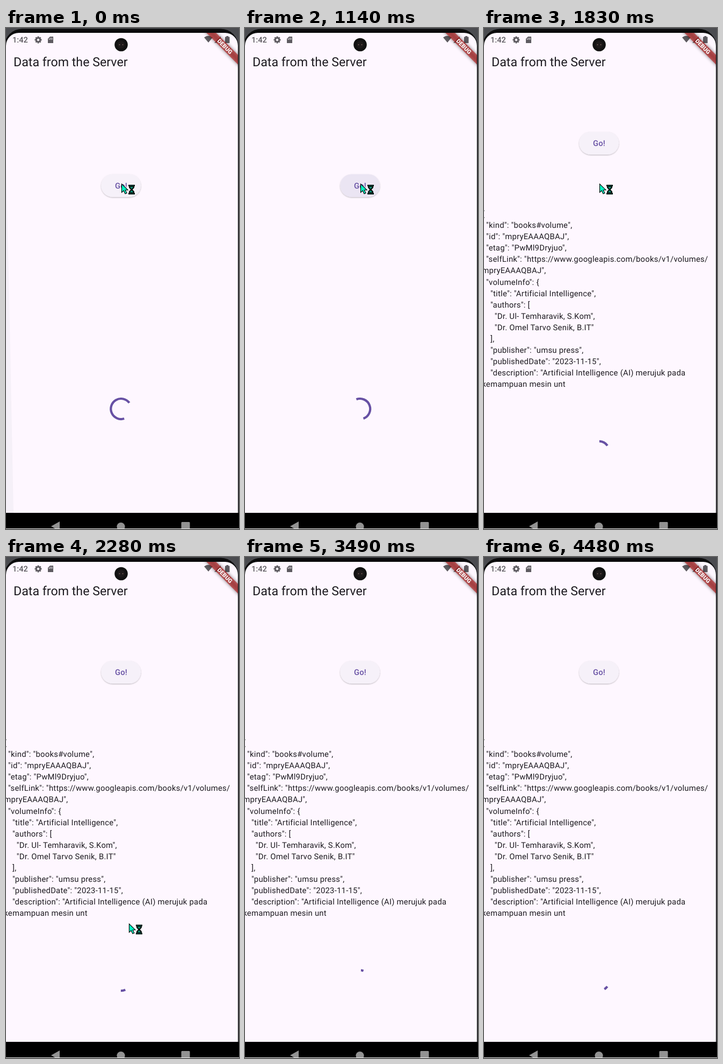
An HTML page for the animation above (4.5 s loop, 434 by 930 pixels).

```html
<!DOCTYPE html>
<html lang="en">
<head>
<meta charset="utf-8">
<title>Future demo</title>
<style>
  html, body { margin: 0; width: 100%; height: 100%; overflow: hidden; background: #000; }
  svg { display: block; width: 434px; height: 930px; }
  text { font-family: Roboto, sans-serif; white-space: pre; text-rendering: geometricPrecision; }
</style>
</head>
<body>
<svg viewBox="0 0 434 930" xmlns="http://www.w3.org/2000/svg">
  <defs>
    <path id="screenShape" d="M0 900V33A24 24 0 0 1 24 9H408A24 24 0 0 1 432 33V900Z"/>
    <clipPath id="screenClip"><use href="#screenShape"/></clipPath>
    <filter id="buttonShadow" x="-20%" y="-20%" width="140%" height="150%">
      <feDropShadow dx="0" dy="1" stdDeviation="0.8" flood-color="#000" flood-opacity="0.28"/>
    </filter>
    <filter id="blur" x="-20%" y="-100%" width="140%" height="300%"><feGaussianBlur stdDeviation="3"/></filter>
  </defs>

  <rect width="434" height="930" fill="#4b4c50"/>
  <rect x="-3" y="1.5" width="436" height="960" rx="33" fill="#0b0b0c"/>
  <use href="#screenShape" fill="#fef7ff"/>
  <path id="edgeShade" d="M0 250L6 500L14 900H0Z" fill="#f5f0f8"/>

  <g fill="#5d5a60">
    <text x="12" y="27" font-size="14.6" font-weight="500">1:42</text>
    <g transform="translate(60 22)">
      <g id="teeth"></g>
      <circle r="3.6" fill="none" stroke="#5d5a60" stroke-width="2.8"/>
    </g>
    <path d="M82 16H88V28H78V20Z"/>
    <path d="M80.5 19.5v2.5M83 18v4M85.7 18v4" stroke="#fef7ff" stroke-width="1"/>
    <path d="M369 17.5Q377 11.5 385 17.5L377 27Z"/>
    <path d="M388 27.5L400 15.5V27.5Z"/>
    <path d="M408 16.5H410.3V15H414.2V16.5H416.5V28H408Z"/>
  </g>
  <circle cx="214.5" cy="31" r="12.3" fill="#121212"/>
  <circle cx="214.5" cy="31" r="7" fill="#1d1a1a"/>
  <circle cx="211.5" cy="31" r="1" fill="#765c58"/>
  <circle cx="217.5" cy="31" r="1" fill="#765c58"/>

  <text x="14" y="71" font-size="23.2" fill="#1d1b20">Data from the Server</text>

  <g id="button">
    <rect id="buttonFace" x="177.3" y="-21.1" width="73.8" height="42.2" rx="21.1" filter="url(#buttonShadow)"/>
    <text x="214.4" y="5.3" text-anchor="middle" font-size="14.76" font-weight="500" letter-spacing="0.1" fill="#6750a4">Go!</text>
  </g>
  <g id="result" font-size="14.8" letter-spacing="0.265" fill="#1d1b20"></g>
  <path id="spinner" fill="none" stroke="#6750a4" stroke-width="4.22"/>

  <g clip-path="url(#screenClip)">
    <g transform="translate(433 9) rotate(45)">
      <rect x="-48" y="29.5" width="96" height="12.7" fill-opacity="0.5" filter="url(#blur)"/>
      <rect x="-48" y="29.5" width="96" height="12.7" fill="#b71c1c" fill-opacity="0.63"/>
      <text y="39.6" text-anchor="middle" font-size="10.75" font-weight="900" fill="#fff">DEBUG</text>
    </g>
  </g>

  <rect y="900" width="434" height="30" fill="#000"/>
  <g fill="#929292">
    <path d="M84 925L100 916V930H93Z"/>
    <circle cx="214" cy="925.5" r="7.6"/>
    <rect x="326.5" y="917" width="16" height="14" rx="1.5"/>
  </g>

  <g id="cursor">
    <path d="M.5 .5V16.2L4.2 12.9L7 18.8L10 17.4L7.2 11.7H12Z" fill="#00f5c4" stroke="#000" stroke-width="1.1"/>
    <path d="M13 2H25V5H24V7.5L20.8 11L24 14.5V17H25V20H13V17H14V14.5L17.2 11L14 7.5V5H13Z" fill="#061411"/>
    <path d="M16 6H22L19 9.5ZM19 12.5L22 16H16Z" fill="#0b9c7e"/>
    <path d="M14.5 3.5H23.5M14.5 18.5H23.5" stroke="#08574a" stroke-width=".8"/>
  </g>
  <rect y="929" width="434" height="1" fill="#f0f0f0"/>
</svg>
<script>
const LOOP = 4500;
const STEP = 140;
const PRESS_AT = 150;
const RESULT_AT = 1290;
const $ = id => document.getElementById(id);
const clamp = v => Math.min(1, Math.max(0, v));

const lines = [
  '{',
  '  "kind": "books#volume",',
  '  "id": "mpryEAAAQBAJ",',
  '  "etag": "PwMl9Dryjuo",',
  '  "selfLink": "https://www.googleapis.com/books/v1/volumes/',
  'mpryEAAAQBAJ",',
  '  "volumeInfo": {',
  '    "title": "Artificial Intelligence",',
  '    "authors": [',
  '      "Dr. Ul- Temharavik, S.Kom",',
  '      "Dr. Omel Tarvo Senik, B.IT"',
  '    ],',
  '    "publisher": "umsu press",',
  '    "publishedDate": "2023-11-15",',
  '    "description": "Artificial Intelligence (AI) merujuk pada',
  'kemampuan mesin unt'
];

// cubic-bezier(0.4, 0, 0.2, 1), solved by bisection
function fastOutSlowIn(x) {
  const u = clamp(x);
  let lo = 0, hi = 1;
  for (let i = 0; i < 20; i++) {
    const s = (lo + hi) / 2, r = 1 - s;
    if (1.2 * s * r * r + 0.6 * s * s * r + s ** 3 < u) lo = s; else hi = s;
  }
  return lo * lo * (3 - 2 * lo);
}

// Material indeterminate progress: the head runs ahead, the tail catches up, all of it turning.
function spinnerArc(t) {
  const clock = t * 1.037;
  const phase = 0.345 + clock / 1333;
  const p = phase % 1;
  const head = 270 * fastOutSlowIn(p * 2);
  const tail = 270 * fastOutSlowIn(p * 2 - 1);
  return { start: 41 + 360 * clock / 2222 + 90 * p + tail + 360 * Math.floor(phase), sweep: Math.max(head - tail, 0.1) };
}

function arcPath(cx, cy, r, { start, sweep }) {
  const point = deg => {
    const a = deg * Math.PI / 180;
    return `${(cx + r * Math.cos(a)).toFixed(2)} ${(cy + r * Math.sin(a)).toFixed(2)}`;
  };
  return `M${point(start)}A${r} ${r} 0 ${sweep > 180 ? 1 : 0} 1 ${point(start + sweep)}`;
}

// The pointer swings down and leaves through the bottom edge.
function cursorPosition(t) {
  const u = clamp((t - 1960) / 700);
  return { x: 215 + 87 * u * u, y: 289 + 638 * fastOutSlowIn(u), gone: t > 2660 };
}

function addNode(parent, tag, attrs, content = '') {
  const node = document.createElementNS('http://www.w3.org/2000/svg', tag);
  for (const key in attrs) node.setAttribute(key, attrs[key]);
  node.textContent = content;
  parent.append(node);
}

lines.forEach((line, i) => addNode($('result'), 'text', { x: -3.8, y: 350 + 21.09 * i }, line));
for (let i = 0; i < 8; i++) {
  addNode($('teeth'), 'rect', { x: -1.4, y: -6.5, width: 2.8, height: 3, transform: `rotate(${i * 45})` });
}

const show = (id, visible) => $(id).setAttribute('visibility', visible ? 'visible' : 'hidden');

function render(t) {
  const held = Math.floor((t + 30) / STEP) * STEP;
  const done = t >= RESULT_AT;
  const pressed = t >= PRESS_AT && !done;
  const cursor = cursorPosition(held);

  show('edgeShade', t < PRESS_AT);
  show('result', done);
  show('cursor', !cursor.gone);
  $('button').setAttribute('transform', `translate(0 ${done ? 213.8 : 292.6})`);
  $('buttonFace').setAttribute('fill', pressed ? '#ebe5f3' : '#f6f1f9');
  $('spinner').setAttribute('d', arcPath(214.3, done ? 786.1 : 707, 18.98, spinnerArc(held)));
  $('cursor').setAttribute('transform', `translate(${cursor.x.toFixed(1)} ${cursor.y.toFixed(1)})`);
}

function tick() {
  render(performance.now() % LOOP);
  requestAnimationFrame(tick);
}
tick();
</script>
</body>
</html>
```
